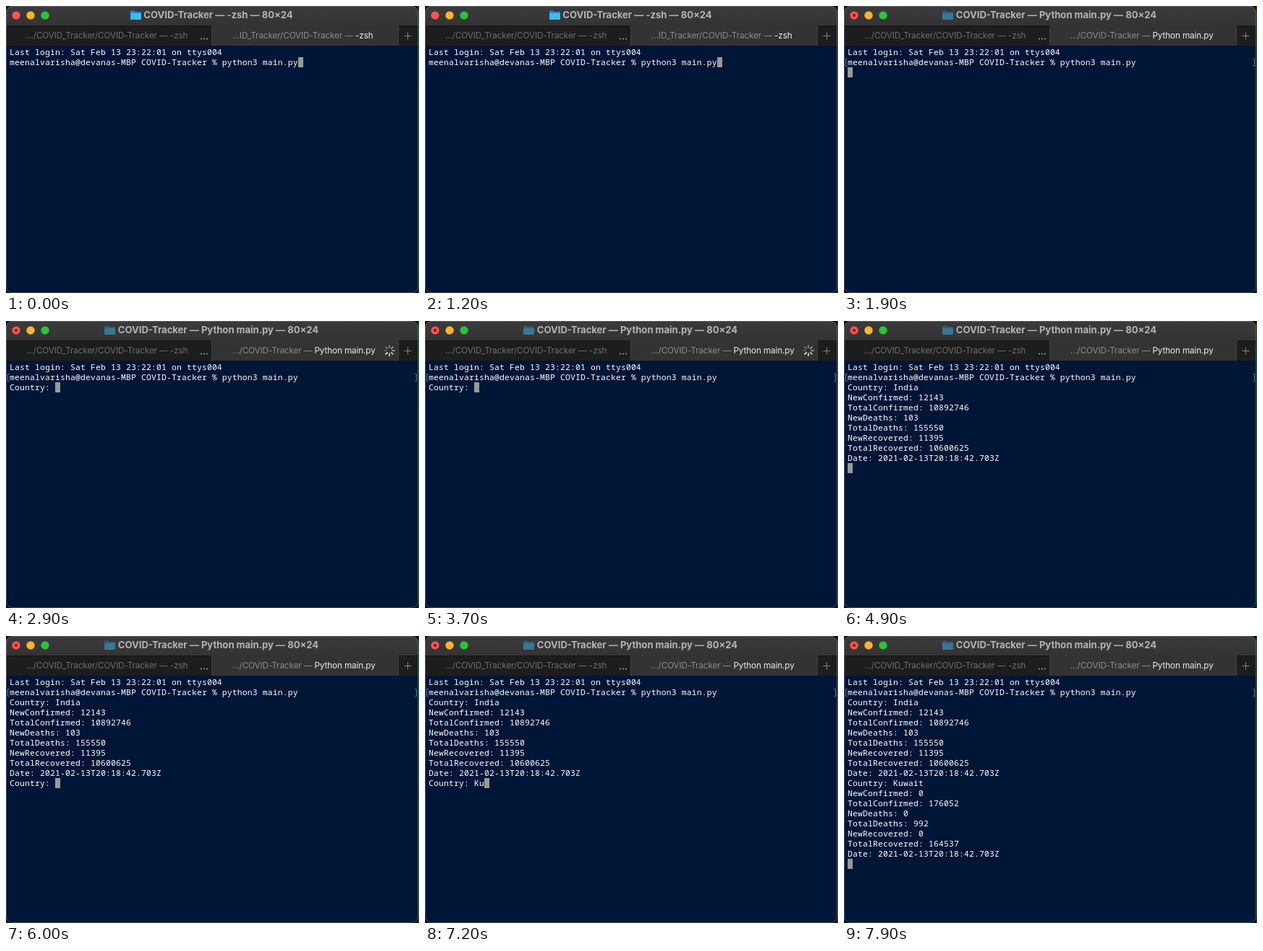
Animation of 571x398 px, one loop 8000 ms. Source, as an HTML page:

```html
<!DOCTYPE html>
<html lang="en">
<head>
<meta charset="utf-8">
<title>Terminal</title>
<style>
  html, body { margin: 0; width: 100%; height: 100%; overflow: hidden; background: #0c160c; }
  svg { display: block; width: 571px; height: 398px; }
  text { white-space: pre; }
  .title { font: 700 13.05px Inter, sans-serif; fill: #b4b4b4; text-anchor: middle; }
  .tab { font: 400 11.7px Inter, sans-serif; letter-spacing: -.1px; fill: #6e6e6e; text-anchor: middle; }
  .mono { font: 500 11.33px "Noto Sans Mono", monospace; letter-spacing: .2px; fill: #fff; }
  .light { stroke: #000; stroke-opacity: .2; stroke-width: .5; }
</style>
</head>
<body>
<svg viewBox="0 0 571 398">
  <defs>
    <clipPath id="frame"><rect width="570" height="398" rx="9"/></clipPath>
    <linearGradient id="bar" x2="0" y2="1">
      <stop stop-color="#3b3b3b"/><stop offset="1" stop-color="#333"/>
    </linearGradient>
  </defs>
  <rect x="570" width="1" height="398" fill="#164a22"/>
  <g clip-path="url(#frame)">
    <rect width="571" height="398" fill="#001637"/>
    <rect width="571" height="28" fill="url(#bar)"/>
    <rect y="27" width="571" height="28" fill="#1d1d1d"/>
    <rect x="285" y="27" width="257" height="28" fill="#333"/>
    <path d="M284.5 27V55M542.5 27V55" stroke="#404040"/>
    <path d="M0 27.5H284M543 27.5H571" stroke="#161616"/>
  </g>
  <rect x=".5" y=".5" width="569" height="397" rx="8.5" fill="none" stroke="#8d97a8" stroke-opacity=".4"/>
  <circle class="light" cx="14" cy="13" r="5.8" fill="#fc5350"/>
  <circle id="busy" cx="14" cy="13" r="2" fill="#7e0d0b"/>
  <circle class="light" cx="34" cy="13" r="5.8" fill="#fdb52b"/>
  <circle class="light" cx="54" cy="13" r="5.8" fill="#2bc33a"/>
  <g id="folder">
    <path id="back" d="M0 1.5Q0 0 1.5 0H5L6.5 1.5H13.5Q15 1.5 15 3V6H0Z"/>
    <rect id="front" y="3.5" width="15" height="9" rx="1.2"/>
  </g>
  <text id="title" class="title" x="293.5" y="17.4"></text>
  <text class="tab" x="139.7" y="45">.../COVID_Tracker/COVID-Tracker — -zsh</text>
  <g fill="#a2a2a2">
    <circle cx="270" cy="45.5" r="1"/><circle cx="274" cy="45.5" r="1"/><circle cx="278" cy="45.5" r="1"/>
  </g>
  <text class="tab" id="tab" y="45"><tspan id="path" fill="#8b8b8b"></tspan><tspan id="job" fill="#ececec"></tspan></text>
  <path d="M550.5 41.5H560.5M555.5 36.5V46.5" stroke="#858585"/>
  <g id="spinner" stroke="#fff" stroke-width="1.7" stroke-linecap="round"></g>
  <path id="marks" d="M4.5 73.5H2.5V83.5H4.5M565.5 73.5H567.5V83.5H565.5" fill="none" stroke="#66748c"/>
  <rect id="cursor" width="7" height="14" fill="#999"/>
  <g id="screen"></g>
</svg>
<script>
const LOOP = 8000, COL = 7, ROW = 14;
const NS = 'http://www.w3.org/2000/svg';
const $ = id => document.getElementById(id);

function add(parent, tag, attrs) {
  const el = document.createElementNS(NS, tag);
  for (const k in attrs) el.setAttribute(k, attrs[k]);
  return parent.appendChild(el);
}
const set = (id, attrs) => { for (const k in attrs) $(id).setAttribute(k, attrs[k]); };
const show = (id, on) => set(id, { visibility: on ? 'visible' : 'hidden' });
const put = (el, s) => { if (el.textContent !== s) el.textContent = s; };

const rows = Array.from({ length: 20 }, (_, i) =>
  add($('screen'), 'text', { class: 'mono', x: 5, y: 68 + i * ROW }));
const spokes = Array.from({ length: 8 }, (_, i) =>
  add($('spinner'), 'path', { d: 'M0-4V-7', transform: `translate(530 41) rotate(${i * 45})` }));

const FIELDS = ['NewConfirmed', 'TotalConfirmed', 'NewDeaths', 'TotalDeaths', 'NewRecovered', 'TotalRecovered'];
const report = (...n) => FIELDS.map((f, i) => `${f}: ${n[i]}\n`).join('') + 'Date: 2021-02-13T20:18:42.703Z\n';
const typed = (word, times, t) => word.slice(0, times.filter(k => t >= k).length);

// Terminal contents: each step appends its text once its time has come.
function contents(t) {
  const steps = [
    [0, 'Last login: Sat Feb 13 23:22:01 on ttys004\n'],
    [0, 'meenalvarisha@devanas-MBP COVID-Tracker % python3 main.py'],
    [1800, '\n'],
    [2300, 'Country: ' + typed('India', [4000, 4300, 4400, 4500, 4600], t)],
    [4800, '\n'],
    [4900, report(12143, 10892746, 103, 155550, 11395, 10600625)],
    [6000, 'Country: ' + typed('Kuwait', [6600, 7200, 7300, 7400, 7600, 7700], t)],
    [7800, '\n'],
    [7900, report(0, 176052, 0, 992, 0, 164537)]
  ];
  return steps.filter(s => t >= s[0]).map(s => s[1]).join('').split('\n');
}

function draw(t) {
  const lines = contents(t), last = lines.length - 1;
  rows.forEach((el, i) => put(el, lines[i] || ''));
  set('cursor', { x: 5 + lines[last].length * COL, y: 57 + last * ROW });
  show('marks', t >= 1800);

  const running = t >= 1900;
  const job = running ? 'Python main.py' : '-zsh';
  put($('title'), `COVID-Tracker — ${job} — 80×24`);
  put($('path'), running ? '.../COVID-Tracker — ' : '...ID_Tracker/COVID-Tracker — ');
  put($('job'), job);
  set('tab', { x: running ? 411.7 : 410.3 });
  set('folder', { transform: `translate(${running ? 136 : 172} 6.5)` });
  set('back', { fill: running ? '#2c5f7b' : '#1b8fd0' });
  set('front', { fill: running ? '#397792' : '#3fb8ee' });
  show('busy', running);

  show('spinner', (t >= 2400 && t < 4000) || (t >= 6500 && t < 6600));
  const head = Math.floor(t / 100) % 8;
  spokes.forEach((el, i) =>
    el.setAttribute('stroke-opacity', 0.9 - 0.09 * ((head - i + 8) % 8)));
}

const start = performance.now();
function tick() {
  draw((performance.now() - start) % LOOP);
  requestAnimationFrame(tick);
}
draw(0);
requestAnimationFrame(tick);
</script>
</body>
</html>
```
